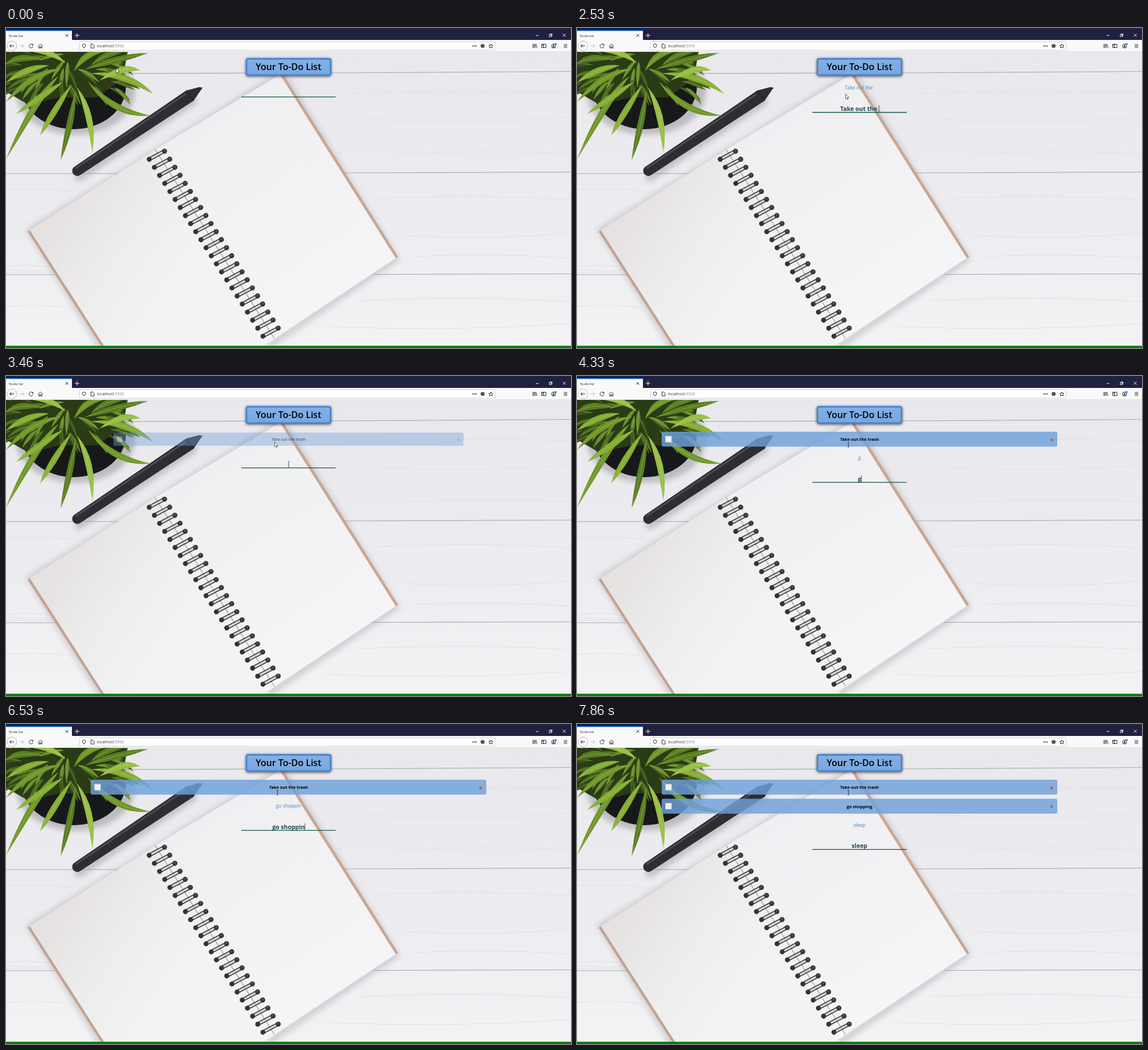
These frames come from a looping animation (994 px wide and 563 px high, 8000 ms). An HTML page:

```html
<!DOCTYPE html>
<html lang="en">
<head>
<meta charset="utf-8">
<title>To-do list</title>
<style>
  html, body { margin: 0; width: 100%; height: 100%; overflow: hidden; }
  svg { display: block; width: 994px; height: 563px; }
  text { font-family: "Open Sans", "Noto Sans", sans-serif; white-space: pre; }
  .mid { text-anchor: middle; }
  .title { font-size: 16px; font-weight: 600; }
  .item { font-size: 7.5px; font-weight: 700; }
  .icon { fill: none; stroke: #2b2b33; stroke-width: 1; }
  .seam { fill: none; stroke: #aaa9ae; stroke-width: 1.1; }
  .grain { fill: none; stroke: #dddce1; stroke-width: .8; }
</style>
</head>
<body>
<svg id="stage" viewBox="0 0 994 563">
  <defs>
    <linearGradient id="wood" x1="0" y1="0" x2="0" y2="1">
      <stop offset="0" stop-color="#e9e8ec"/>
      <stop offset=".6" stop-color="#edecf0"/>
      <stop offset="1" stop-color="#f3f2f4"/>
    </linearGradient>
    <linearGradient id="leftPage" gradientUnits="userSpaceOnUse" x1="90" y1="330" x2="300" y2="470">
      <stop offset="0" stop-color="#e5e2e1"/>
      <stop offset=".55" stop-color="#efeeef"/>
      <stop offset="1" stop-color="#f4f3f4"/>
    </linearGradient>
    <linearGradient id="rightPage" gradientUnits="userSpaceOnUse" x1="340" y1="150" x2="560" y2="480">
      <stop offset="0" stop-color="#efeef1"/>
      <stop offset="1" stop-color="#f5f4f6"/>
    </linearGradient>
    <linearGradient id="button" x1="0" y1="0" x2="0" y2="1">
      <stop offset="0" stop-color="#84b0e6"/>
      <stop offset="1" stop-color="#78a6df"/>
    </linearGradient>
    <filter id="blur" x="-30%" y="-30%" width="160%" height="160%"><feGaussianBlur stdDeviation="5"/></filter>
    <filter id="glow" x="-20%" y="-60%" width="140%" height="220%"><feGaussianBlur stdDeviation="2.6"/></filter>
  </defs>

  <!-- desk -->
  <rect y="42" width="994" height="521" fill="url(#wood)"/>
  <path class="grain" d="M600 115Q800 108 994 114M640 160Q800 170 994 157M690 222Q840 214 994 221M650 300Q830 292 994 302M700 365Q860 374 994 360M720 402Q850 395 994 405M620 480Q820 470 994 482M560 525Q780 535 994 520M0 285Q60 280 120 288M0 420Q40 415 82 421M0 425Q40 429 84 426M0 430H88M0 490Q60 485 110 492"/>
  <path class="seam" d="M200 80L570 79 994 76.5M0 256H200M590 255L994 253.5M0 434H100M630 433.5L994 432.5"/>

  <!-- notebook -->
  <path d="M34 354L478 78 495 84 694 408 470 562H160Z" fill="#8e8c92" opacity=".3" filter="url(#blur)"/>
  <path d="M40 357L264 213 474 546 455 563H172Z" fill="url(#leftPage)"/>
  <path d="M264 213L482 82 688 404 455 560Z" fill="url(#rightPage)"/>
  <path d="M485 82L688 404" stroke="#c9a793" stroke-width="5"/>
  <path d="M40 357L171 561" stroke="#c2a392" stroke-width="4.5"/>
  <path d="M688 404L455 559" stroke="#d5d3d5" stroke-width="1.2"/>
  <path d="M262 213L472 546" stroke="#a9a39c" stroke-width="1.4"/>
  <g id="rings"></g>

  <!-- pen -->
  <path d="M128 262L328 128" stroke="#77757c" stroke-width="16" stroke-linecap="round" opacity=".35" filter="url(#blur)"/>
  <path d="M119 245L317 110 340 104 346 105 343 109 330 128 130 259A9 9 0 0 1 119 245Z" fill="#2d2d33"/>
  <path d="M122 247L316 116" stroke="#4b4b53" stroke-width="3"/>
  <path d="M317 110L330 128" stroke="#1d1d22" stroke-width="1.2"/>

  <!-- plant -->
  <ellipse cx="122" cy="112" rx="105" ry="76" fill="#66656b" opacity=".35" filter="url(#blur)"/>
  <ellipse cx="119" cy="103" rx="92" ry="75" fill="#17181a"/>
  <path d="M0 42H214L205 90 160 122 95 122 40 135 0 112Z" fill="#2b3b15"/>
  <g id="leaves"></g>

  <!-- browser -->
  <rect width="994" height="21.5" fill="#20203f"/>
  <rect y="4" width="116" height="18" fill="#f9f9fa"/>
  <rect y="4" width="116" height="1.3" fill="#0a84ff"/>
  <rect y="21" width="994" height="21" fill="#f9f9fa"/>
  <rect y="41.4" width="994" height=".6" fill="#d2d2d6"/>
  <text x="4.5" y="15.6" font-size="6.1" fill="#18181c">To-do list</text>
  <path class="icon" d="M104.8 10.8l4.6 4.6m0-4.6l-4.6 4.6"/>
  <path class="icon" style="stroke:#f4f4f8" d="M121 13h8m-4-4v8M932 13.2h5M979.7 10.2l5 5m0-5l-5 5M955.8 11.8h3.6v3.4h-3.6zM957 11.6v-1.2h3.6v3.6h-1"/>
  <circle cx="10.4" cy="31.5" r="8.4" fill="#fff" stroke="#b5b5ba"/>
  <path class="icon" stroke-width="1.2" d="M14.5 31.5H6.6m3.3-3.3l-3.4 3.3 3.4 3.3M46.9 29.5a3.5 3.5 0 1 0 .6 2.6M47.6 27.8v2.4h-2.5M56.6 31.8l3.9-3.7 3.9 3.7M57.8 31.5v3.8h1.8v-2.3h1.8v2.3h1.8v-3.8"/>
  <path class="icon" style="stroke:#bdbdc3" d="M23.5 31.5h7.6m-3.2-3.3l3.3 3.3-3.3 3.3"/>
  <rect x="129.5" y="24.2" width="731" height="14.8" rx="1.5" fill="#fff" stroke="#cbcbd0" stroke-width=".9"/>
  <path class="icon" stroke-width=".9" d="M134.5 29l2.7-1 2.7 1q.2 4.6-2.7 6.3-2.9-1.700-2.700-6.300M149.500 28h3.200l2.300 2.300v5h-5.500zM853 28l1.100 2.500 2.700.2-2.100 1.800.7 2.700-2.400-1.500-2.400 1.500.7-2.700-2.100-1.800 2.700-.2z"/>
  <text x="160.300" y="34.300" font-size="7" fill="#303036">localhost<tspan fill="#85858c">:5500</tspan></text>
  <path d="M820.500 31.600h7.500" stroke="#2b2b33" stroke-width="1.800" stroke-dasharray="1.800 1.050"/>
  <circle cx="838.500" cy="31.500" r="3.600" fill="#55555d"/>
  <path class="icon" d="M927 28v7M929 28v7M931 28v7M932.300 28.200l2 6.800M942.500 28.500h7.400v6h-7.400zM945.500 28.500v6M943 30.200h2M981.200 29h6.200M981.200 31.500h6.200M981.200 34h6.200"/>
  <circle class="icon" cx="963.400" cy="31.700" r="3.700"/>
  <path d="M961 34a2.500 2.500 0 0 1 4.800 0z" fill="#2b2b33"/>
  <circle cx="963.400" cy="30.700" r="1.300" fill="#2b2b33"/>
  <circle cx="967" cy="28.300" r="1.700" fill="#0a84ff"/>
  <rect y="559" width="994" height="4" fill="#008000"/>

  <!-- app -->
  <rect x="422" y="54" width="150" height="31" rx="4" fill="#111" opacity=".75" filter="url(#glow)"/>
  <rect x="423.200" y="54.200" width="147.600" height="28.600" rx="2.500" fill="url(#button)" stroke="#3f82d2" stroke-width="2.400"/>
  <text class="title mid" x="497" y="73.700">Your To-Do List</text>
  <g id="items"></g>
  <text id="preview" class="mid" x="497" font-size="8.600" fill="#4b88bd"></text>
  <text id="entry" class="mid" x="497" font-size="10.500" font-weight="700" fill="#1f4650"></text>
  <path id="line" d="M414 0H580" stroke="#0d5540" stroke-width="1.300"/>
  <path id="caret" d="M0-12.500V-.5" stroke="#222" stroke-width=".8"/>
  <path id="arrow" d="M0 0V8.600L2 6.800 3.400 9.900 4.700 9.300 3.400 6.300H6Z" fill="#fff" stroke="#25252a" stroke-width=".7"/>
  <path id="beam" d="M3.300 1H4.600L5 1.400 5.400 1H6.700M5 1.400V8.600M3.300 9H4.600L5 8.600 5.400 9H6.700" fill="none" stroke="#222" stroke-width=".8"/>
</svg>
<script>
const LOOP = 8000, FRAME = 200 / 3;
const $ = id => document.getElementById(id);

// Each task: when every key lands, an optional span with the last letter erased, and Enter.
const tasks = [
  { text: 'Take out the trash', enter: 3400,
    keys: [1260, 1400, 1460, 1530, 1660, 1800, 1930, 2000, 2200, 2260, 2400, 2460, 2530, 2660, 2800, 2930, 3000, 3130] },
  { text: 'go shopping', enter: 6800, erased: [5660, 6060],
    keys: [4330, 4460, 4530, 4660, 4730, 4860, 5130, 6200, 6330, 6530, 6660] },
  { text: 'sleep', enter: Infinity, keys: [7330, 7460, 7600, 7660, 7800] }
];
// Input underline by number of listed tasks: empty field, field with text.
const lineY = [[121.3, 148.5], [161.7, 187.2], [195.2, 220.7]];
const previewY = [108.2, 147.2, 180.6];
const pointerPath = [[0, 193.5, 71], [260, 294, 68.5], [400, 294, 68.5], [460, 296, 69], [540, 296, 69], [860, 472.5, 116]];

function drawRings() {
  let out = '';
  for (let i = 0; i < 23; i++) {
    out += `<g transform="translate(${252 + i * 9.09} ${231 + i * 14.15}) rotate(-28)">
      <path d="M0-2.600H30M1 2.400H30" stroke="#3c3c3f" stroke-width="1.700"/>
      <path d="M3-.2H28" stroke="#d0cecd" stroke-width="2"/>
      <circle r="4.400" fill="#343437"/><circle cx="30.500" r="4.500" fill="#39393c"/>
      <circle cx="31" cy="-1" r="1.500" fill="#5b5b5f"/></g>`;
  }
  $('rings').innerHTML = out;
}

function leaf([bx, by, cx, cy, tx, ty], width, color) {
  const length = Math.hypot(tx - bx, ty - by);
  const nx = -(ty - by) / length * width, ny = (tx - bx) / length * width;
  const blade = side => `${cx + nx * side} ${cy + ny * side}`;
  return `<path d="M${bx} ${by}Q${blade(1)} ${tx} ${ty}Q${blade(-1)} ${bx} ${by}" fill="${color}"/>
    <path d="M${bx} ${by}Q${cx} ${cy} ${tx} ${ty}" fill="none" stroke="#d3e67c" stroke-width=".8" opacity=".45"/>`;
}

function drawLeaves() {
  let seed = 11, out = '';
  const random = () => (seed = seed * 16807 % 2147483647) / 2147483647;
  const greens = ['#6f962b', '#86ad35', '#587d22', '#98bd46'];
  for (let i = 0; i < 46; i++) {
    const x = random() * 195, y = 40 + random() * 65, angle = Math.atan2(y - 45, x - 105) + random() - .5;
    const dx = Math.cos(angle) * 45, dy = Math.sin(angle) * 40;
    out += leaf([x, y, x + dx * .5, y + dy * .5 - 6, x + dx, y + dy], 7, ['#48651c', '#35501a', '#64892a'][i % 3]);
  }
  const long = [
    [92, 85, 55, 120, 0, 231], [100, 95, 60, 122, 18, 151], [122, 112, 115, 165, 96, 233],
    [125, 105, 152, 150, 152, 219], [145, 95, 190, 152, 255, 154], [150, 80, 215, 80, 259, 116],
    [140, 72, 190, 55, 250, 44], [165, 92, 210, 64, 236, 75], [95, 72, 45, 80, 0, 130],
    [75, 66, 35, 70, 0, 96], [65, 55, 25, 48, 0, 62], [105, 62, 70, 32, 30, 40],
    [120, 75, 140, 40, 172, 42], [115, 100, 82, 150, 60, 189], [150, 65, 180, 40, 214, 40]
  ];
  long.forEach((points, i) => out += leaf(points, 11, greens[i % greens.length]));
  $('leaves').innerHTML = out;
}

function drawItems() {
  $('items').innerHTML = tasks.slice(0, 2).map(task => `<g>
    <rect x="-348" y="-13.100" width="696" height="26.200" rx="3" fill="#6fa1dc" fill-opacity=".82"/>
    <rect x="-341.500" y="-5.500" width="11" height="11" rx=".8" fill="#f1f1f2" stroke="#a9abb0" stroke-width=".8"/>
    <text class="item mid" y="3">${task.text}</text>
    <text class="mid" x="338" y="3.700" font-size="8.500" font-weight="700" fill="#b4481f">x</text></g>`).join('');
}

function pointerAt(t) {
  const next = pointerPath.findIndex(p => p[0] > t);
  if (next < 0) return pointerPath.at(-1).slice(1);
  const [t0, x0, y0] = pointerPath[next - 1], [t1, x1, y1] = pointerPath[next];
  const u = (t - t0) / (t1 - t0), ease = u * u * (3 - 2 * u);
  return [x0 + (x1 - x0) * ease, y0 + (y1 - y0) * ease];
}

function typedText({ text, keys, erased }, t) {
  const count = keys.filter(key => key <= t).length;
  const isErased = erased && t >= erased[0] && t < erased[1];
  return text.slice(0, count - (isErased ? 1 : 0));
}

function place(id, x, y) {
  $(id).setAttribute('transform', `translate(${x} ${y})`);
}

function show(id, visible) {
  $(id).style.display = visible ? '' : 'none';
}

function render(t) {
  const frameTime = Math.floor((t + 7) / FRAME) * FRAME;
  const listed = tasks.filter(task => task.enter <= t).length;
  const text = typedText(tasks[listed], t);
  const y = lineY[listed][text ? 1 : 0];

  [...$('items').children].forEach((item, i) => {
    const u = Math.min(1, Math.max(0, (frameTime - tasks[i].enter + 30) / 330));
    const shown = 1 - (1 - u) ** 2;
    item.style.display = t >= tasks[i].enter ? '' : 'none';
    item.setAttribute('opacity', shown);
    item.setAttribute('transform', `translate(497 ${111.2 + i * 33.4}) scale(${.77 + .23 * shown})`);
  });

  $('preview').textContent = $('entry').textContent = text;
  $('preview').setAttribute('y', previewY[listed]);
  $('entry').setAttribute('y', y - 2.4);
  place('line', 0, y);
  const width = text ? $('entry').getComputedTextLength() : 0;
  place('caret', 497.3 + width / 2, y);
  show('caret', t >= 860 && !(t >= 4060 && t < 4330) && t < 7800);

  const [px, py] = pointerAt(frameTime);
  const overText = (t >= 800 && t < 1260) || t >= 4330;
  place('arrow', px, py);
  place('beam', px, py);
  show('arrow', !overText);
  show('beam', overText);
}

drawRings();
drawLeaves();
drawItems();
const start = performance.now();
(function tick() {
  render((performance.now() - start) % LOOP);
  requestAnimationFrame(tick);
})();
</script>
</body>
</html>
```
